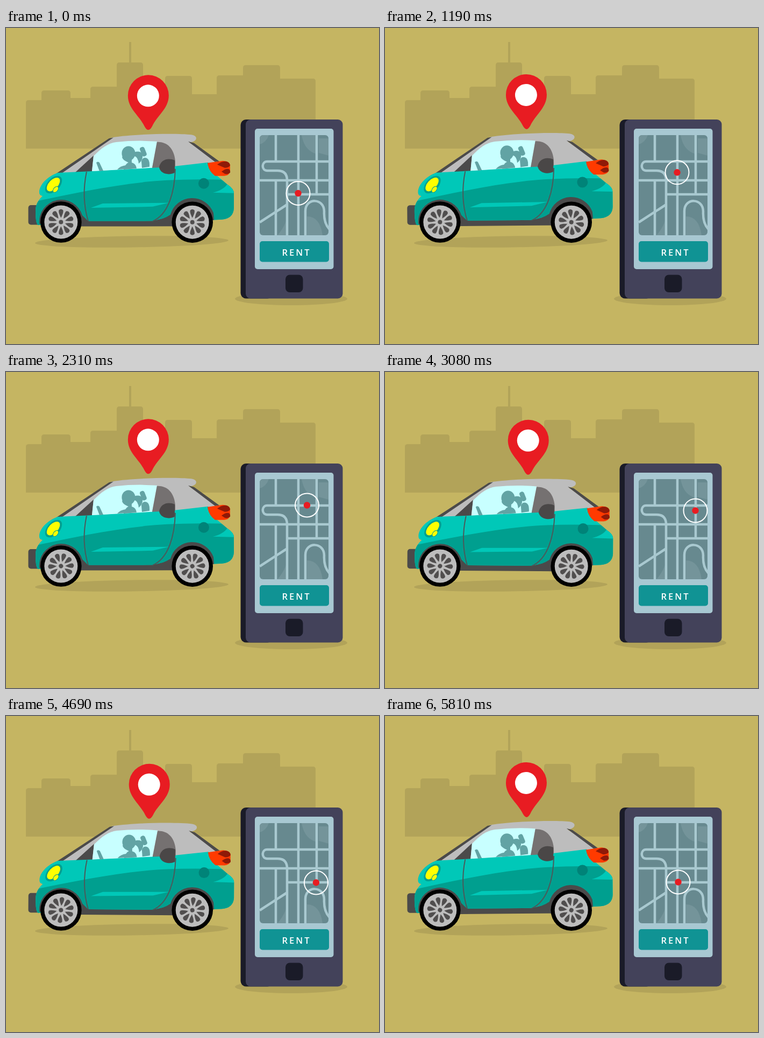
Write an HTML page that moves like this. It is 694 px wide and 587 px high and loops after 5880 ms.

```html
<!DOCTYPE html>
<html lang="en">
<head>
<meta charset="utf-8">
<title>Car rental</title>
<style>
  html, body { margin: 0; width: 100%; height: 100%; overflow: hidden; background: #c5b562; }
  svg { display: block; width: 100vw; height: 100vh; }
  .label { font: 600 16.5px "Open Sans", "Noto Sans", sans-serif; letter-spacing: 3px; fill: #fff; }
</style>
</head>
<body>
<svg viewBox="0 0 694 587">
  <defs>
    <clipPath id="mapClip"><rect x="472" y="199" width="128" height="186" rx="6"/></clipPath>
    <clipPath id="bodyClip"><use href="#shell"/></clipPath>
    <path id="shell" d="M62 306C61 293 76 276 96 269L160 266 314 257 376 250 393 275 412 291Q424 299 424 307V335Q423 354 402 356L380 357 310 350 273 358.500 152 358.500 60 366Q55 364 55 340C55 328 60 320 68 312Q62 311 62 306Z"/>
    <g id="wheel">
      <circle r="38.300"/>
      <circle r="31" fill="#bdbdbd"/>
      <g class="spokes" fill="#504e4e"></g>
    </g>
  </defs>
  <rect width="694" height="587" fill="#c5b562"/>

  <g id="skyline" fill="#b2a359"></g>
  <g fill="#b2a359">
    <ellipse cx="234" cy="397" rx="180" ry="10.500" transform="rotate(-.8 234 397)"/>
    <ellipse cx="530.500" cy="503" rx="104.500" ry="12"/>
  </g>

  <g id="body">
    <path fill="#e81c22" d="M265 189.500Q261.500 189.500 258 183C248 162 227 150 227 125.500A38 38 0 0 1 303 125.500C303 150 282 162 272 183Q268.500 189.500 265 189.500Z"/>
    <circle cx="264.500" cy="126" r="20.500" fill="#fff"/>

    <rect x="41.500" y="329" width="24" height="36.500" rx="5" fill="#4b4a4a"/>
    <path fill="#4b4a4a" d="M130 345L152 357H275L320 335V368.500H140Z"/>

    <path fill="#bdbdbd" d="M95 270L197 203.500C240 196.500 320 195.500 345 198.500Q357 201 353 208Q350 212 341 213L392 248 376 252 314 258 160 267Z"/>
    <path fill="#4b4a4a" d="M94 270L192 205 200 203.500 105 269ZM128 269L163 237 160 267ZM339 211L350 214 397 248 389 249Z"/>

    <use href="#shell" fill="#00c8b8"/>
    <g clip-path="url(#bodyClip)">
      <path fill="#009f8f" d="M50 323C130 306 220 287 300 283Q360 280 430 283V375H50Z"/>
      <path fill="#00c8b8" d="M158 334L180 326 303 325 273 332ZM385 306Q405 301 412 290L426 299V307Z"/>
    </g>
    <path fill="#c8ffff" d="M160 266L163 238C177 223 190 214 205 212Q244 208 281 211L272 260Z"/>
    <g fill="#62a3a4">
      <ellipse cx="228" cy="233" rx="12.500" ry="13.500"/>
      <path d="M225 239L234 244V250Q242 252 243 261L219 263Q222 252 228 250Q216 245 216 239Z"/>
      <path d="M238 231Q249 227 254 234Q256 245 247 252Q246 240 239 238Z"/>
      <path d="M253 260L252 247Q255 239 262 242Q268 245 267 258Z"/>
      <rect x="251" y="221" width="9" height="18" rx="4" transform="rotate(-22 255 230)"/>
      <path d="M168 250Q171 247 174 250L181 265 174 266Z"/>
      <path d="M207 263Q213 256 223 255V262Z"/>
    </g>
    <path fill="#757171" d="M281 212C298 211 313 222 315 248V258L272 260Z"/>
    <path fill="#4a4747" d="M285 259C287 246 300 240 314 246V269C301 275 287 270 285 259Z"/>
    <g fill="none" stroke="#4b5a5a" stroke-width="2">
      <path d="M150 267C143 300 145 332 153 359"/>
      <path d="M315 262C314 303 303 346 273 359"/>
    </g>

    <path fill="#ff3a00" d="M375 251L403 247Q417 248 417 256V268Q415 274 406 275L389 275Q377 266 375 251Z"/>
    <path fill="#8f1a08" d="M393 254Q401 247 410 248Q417 250 417 256Q414 260 407 260ZM401 267Q408 261 414 262Q418 264 417 269Q412 273 407 271Z"/>
    <circle cx="368" cy="289" r="10" fill="#008378"/>

    <g transform="rotate(-47 88.500 291)">
      <ellipse cx="88.500" cy="291" rx="19.500" ry="11.500" fill="#009f8f"/>
      <ellipse cx="88.500" cy="290.500" rx="15.500" ry="8.500" fill="#ff0"/>
    </g>
    <ellipse cx="92.500" cy="300" rx="6.500" ry="4" fill="#ff0" stroke="#009f8f" transform="rotate(-50 92.500 300)"/>
    <path fill="#4b4a4a" d="M62 364A41 41 0 0 1 142 348L153 359V368ZM273 359Q293 356 306 347A42 42 0 0 1 386 344L387 357 308 368.500Z"/>
  </g>
  <use href="#wheel" x="102.300" y="360.500"/>
  <use href="#wheel" x="346.700" y="360.700"/>

  <rect x="436.500" y="170" width="60" height="332.500" rx="10" fill="#1a1b28"/>
  <rect x="446" y="170" width="180.500" height="332.500" rx="9" fill="#43425a"/>
  <rect x="463" y="187" width="146.500" height="261" rx="5" fill="#a8c8d2"/>
  <g clip-path="url(#mapClip)">
    <rect x="472" y="199" width="128" height="186" fill="#67898f"/>
    <g fill="#74949a">
      <path d="M472 199H489Q484 213 472 216ZM550 199H578V234Q555 228 550 199ZM582 205H600V237L582 232Z"/>
      <path d="M505 385Q529 358 522 330V385ZM560 385V350Q584 350 589 385Z"/>
    </g>
    <g fill="none" stroke="#a9c9d0" stroke-width="4.500">
      <path d="M502 199V248M502 283V385M544 199V385M578 199V309M472 283H600M523 309H600"/>
      <path d="M600 248H486C475 248 475 265 486 265H505Q523 265 523 283V385M472 361L523 328"/>
      <path d="M557 385V340C557 315 592 315 592 341Q591 363 602 374"/>
    </g>
  </g>
  <rect x="472" y="396" width="129" height="38.500" rx="5" fill="#109394"/>
  <text class="label" x="513.500" y="423">RENT</text>
  <rect x="520" y="458.500" width="32.500" height="32.500" rx="8" fill="#1a1b28"/>
  <g id="marker">
    <circle r="22" fill="none" stroke="#fff" stroke-width="2"/>
    <circle r="6.200" fill="#e81c22"/>
  </g>
</svg>
<script>
const LOOP = 5880, STEP = 70, GROUND = 224;
const byId = id => document.getElementById(id);

// left, right, top of each building
const buildings = [
  [37, 70, 134], [66, 120, 116], [112, 162, 130], [157, 210, 109], [206, 255, 64],
  [250, 300, 112], [296, 346, 89], [340, 396, 123], [392, 446, 88], [441, 510, 69], [500, 576, 94]
];
byId('skyline').innerHTML = '<path d="M229 70V26H233V70Z"/>' + buildings.map(([l, r, y]) =>
  `<path d="M${l} ${GROUND}V${y + 5}q0-5 5-5H${r - 5}q5 0 5 5V${GROUND}Z"/>`).join('');

const spokes = document.querySelector('.spokes');
spokes.innerHTML = '<circle r="4"/>' + Array.from({ length: 10 }, (_, i) =>
  `<path d="M0-8C-2-12-5-18-4-22Q0-26 4-22C5-18 2-12 0-8Z" transform="rotate(${i * 36})"/>`).join('');

// time, x, y along the streets
const route = [
  [0, 543.5, 307], [1830, 543.5, 247.5], [2310, 560, 247.5], [2790, 577.5, 247.5],
  [3780, 577.5, 281.5], [4670, 577.5, 309.5], [5810, 545.5, 308.5], [LOOP, 543.5, 307]
];

function along(t) {
  const i = route.findIndex(p => p[0] > t);
  const [t0, x0, y0] = route[i - 1], [t1, x1, y1] = route[i];
  const k = (t - t0) / (t1 - t0);
  return [x0 + (x1 - x0) * k, y0 + (y1 - y0) * k];
}

function render(now) {
  const t = Math.floor((now % LOOP) / STEP) * STEP;
  const turn = t / LOOP;
  const rock = 0.53 * Math.sin(2 * Math.PI * 14 * turn) - 0.04;
  byId('body').setAttribute('transform', `rotate(${rock} 80 360)`);
  spokes.setAttribute('transform', `rotate(${-360 * 6 * turn})`);
  byId('marker').setAttribute('transform', `translate(${along(t)})`);
}

const start = performance.now();
function tick() {
  render(performance.now() - start);
  requestAnimationFrame(tick);
}
tick();
</script>
</body>
</html>
```
